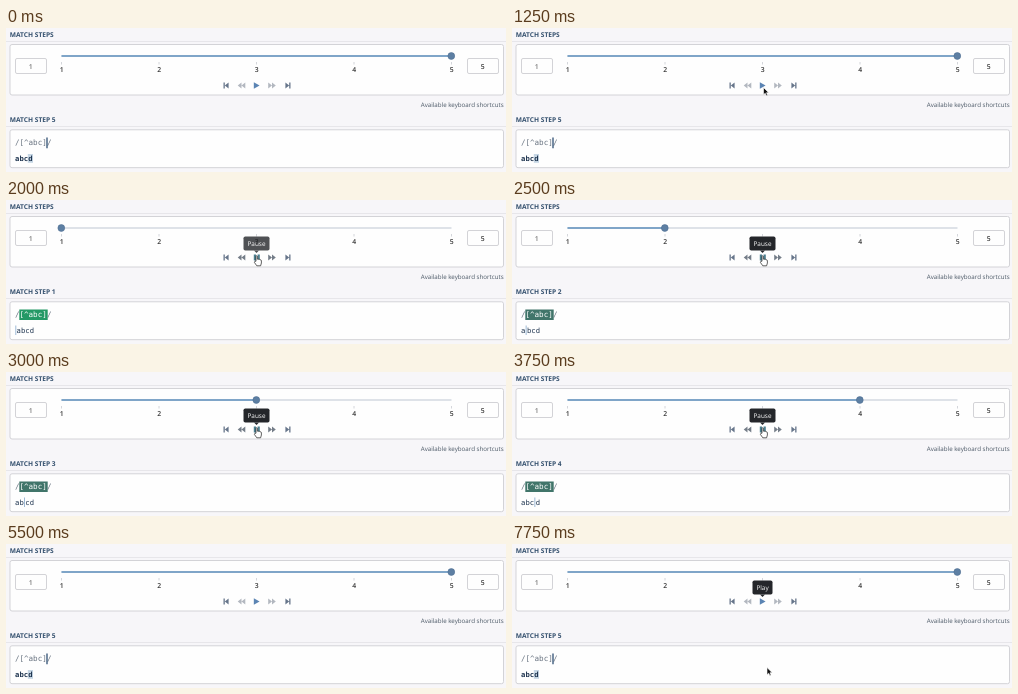
An HTML page for the animation above (8 s loop, 500 px wide and 144 px high).

```html
<!DOCTYPE html>
<html lang="en">
<head>
<meta charset="utf-8">
<title>Match steps</title>
<style>
html, body { margin: 0; width: 100%; height: 100%; overflow: hidden; background: #f7f6f9; }
svg { display: block; width: 500px; height: 144px; font-family: "Open Sans", sans-serif; text-rendering: geometricPrecision; }
.title { font-size: 6.6px; font-weight: 700; fill: #34506e; }
.mid { text-anchor: middle; font-size: 6.8px; font-weight: 600; fill: #333; }
.code { font-family: "DejaVu Sans Mono", monospace; font-size: 7.6px; white-space: pre; }
.box { fill: #fefefe; stroke: #d3d3d7; }
.rule { stroke: #e7e6ea; }
.dark { fill: #66758a; }
</style>
</head>
<body>
<svg viewBox="0 0 500 144">
  <path class="rule" d="M0 13.5H500M0 98.5H500"/>
  <text class="title" x="3.8" y="8.8">MATCH STEPS</text>
  <rect class="box" x="4" y="16.5" width="493.5" height="50.5" rx="2"/>
  <rect class="box" x="9.5" y="30.5" width="31" height="15" rx="1.5"/>
  <rect class="box" x="461.5" y="30.5" width="31" height="15" rx="1.5"/>
  <text class="mid" x="24.8" y="40.6" style="fill:#777">1</text>
  <text class="mid" x="476.8" y="40.6">5</text>
  <g id="ticks"></g>
  <path d="M55.5 28H445.5" stroke="#d3d9e1" stroke-width="1.6"/>
  <path id="fill" stroke="#7fa5c8" stroke-width="1.8"/>
  <circle id="knob" cy="28" r="3.4" fill="#5d7fa3" stroke="#4f6f92" stroke-width=".6"/>

  <path class="dark" d="M217.5 54.5h1.3v6h-1.3zM222.6 54.5v6l-3.8-3z"/>
  <path class="skip" d="M235.5 54.5v6l-3.8-3zM239.3 54.5v6l-3.8-3z"/>
  <path id="play" d="M247.8 54.2l5.8 3.3-5.8 3.3z" fill="#5b84b3"/>
  <path id="pause" d="M247.8 54.5h2.2v6h-2.2zM251.6 54.5h2.2v6h-2.2z" fill="#4d7f8f"/>
  <path class="skip" d="M262.2 54.5v6l3.8-3zM266 54.5v6l3.8-3z"/>
  <path class="dark" d="M279.4 54.5v6l3.8-3zM283.2 54.5h1.3v6h-1.3z"/>

  <g id="tip">
    <rect id="tipBox" y="36.5" height="14" rx="1.8" fill="#24262a"/>
    <path d="M248 50.4h5l-2.5 2.6z" fill="#24262a"/>
    <text id="tipText" class="mid" x="250.5" y="45.8" style="fill:#fff;font-size:6.4px;font-weight:400"></text>
  </g>

  <text x="497.7" y="79.1" text-anchor="end" font-size="6.2" fill="#4b5866">Available keyboard shortcuts</text>
  <text id="title" class="title" x="3.8" y="93.8"></text>
  <rect class="box" x="4" y="101.8" width="493.5" height="37.9" rx="2"/>
  <rect id="mark" x="13.3" y="109.5" width="28.4" height="10.5"/>
  <g class="code">
    <text x="9" y="117.4" fill="#687380">/</text>
    <text id="set" x="13.4" y="117.4">[^abc]</text>
    <text x="41" y="117.4" fill="#687380">/</text>
  </g>
  <path id="patternCaret" d="M41 109.6V120.2" stroke="#2f4f73" stroke-width="1.3"/>
  <rect id="found" x="21.8" y="126" width="5.2" height="8.8" fill="#c6d6e4"/>
  <g id="letters" class="code" style="font-size:7.2px" fill="#1f3550"></g>
  <path id="caret" stroke="#9db9d6"/>

  <path id="arrow" d="M0 0V7.2L1.7 5.7 2.9 8.3 4.1 7.7 3 5.2H5.2Z" fill="#111" stroke="#fff" stroke-width=".6"/>
  <path id="hand" transform="translate(248 55)" fill="#fff" stroke="#222" stroke-width=".7"
    d="M2 6.2V1.2Q2.7 .2 3.4 1.2V4.2Q4.2 3.6 4.8 4.5 5.6 4 6.1 4.8 7.2 4.5 7.4 5.6V8L6.6 10.8H2.8L.4 7.4Q.4 6 2 6.2Z"/>
</svg>
<script>
const $ = id => document.getElementById(id);
const add = (parent, tag, attrs, text = "") => {
  const el = document.createElementNS("http://www.w3.org/2000/svg", tag);
  for (const k in attrs) el.setAttribute(k, attrs[k]);
  el.textContent = text;
  return parent.appendChild(el);
};
const show = (id, on) => $(id).style.display = on ? "" : "none";
const stepX = n => 55.5 + 97.5 * (n - 1);

for (let n = 1; n <= 5; n++) {
  add($("ticks"), "path", { d: `M${stepX(n)} 34v2.5`, stroke: "#c9ccd2", "stroke-width": .8 });
  add($("ticks"), "text", { x: stepX(n) + .2, y: 44, class: "mid" }, n);
}
const letters = [..."abcd"].map(c => add($("letters"), "text", { y: 132.8 }, c));

// Each cue changes only the listed parts of the state.
const idle = { step: 5, playing: false, tip: "", alpha: 1, arrow: null, hand: false };
const cues = [
  [0, idle],
  [750, { arrow: [256, 122] }],
  [1000, { arrow: [254, 90] }],
  [1250, { arrow: [251.5, 59.5] }],
  [1500, { arrow: null, hand: true, tip: "Play", alpha: .8 }],
  [1750, { alpha: 1 }],
  [2000, { step: 1, playing: true, tip: "Pause", alpha: .8 }],
  [2250, { alpha: 1 }],
  [2500, { step: 2 }],
  [3000, { step: 3 }],
  [3750, { step: 4 }],
  [4250, { step: 5 }],
  [4750, { playing: false, tip: "Play" }],
  [5000, { hand: false, arrow: [255, 124] }],
  [5250, { arrow: null, alpha: .4 }],
  [5500, idle],
  [7750, { tip: "Play", arrow: [255, 123.5] }]
];

function draw(t) {
  const s = Object.assign({}, ...cues.filter(c => c[0] <= t).map(c => c[1]));
  const done = s.step === 5, x = stepX(s.step);

  $("fill").setAttribute("d", `M55.5 28H${x}`);
  $("knob").setAttribute("cx", x - .2);
  $("title").textContent = "MATCH STEP " + s.step;
  show("play", !s.playing);
  show("pause", s.playing);
  for (const el of document.querySelectorAll(".skip"))
    el.setAttribute("fill", s.playing ? "#747d88" : "#b3b8c0");

  show("tip", s.tip);
  $("tip").setAttribute("opacity", s.alpha);
  $("tipText").textContent = s.tip;
  const w = s.tip === "Pause" ? 26 : 20;
  $("tipBox").setAttribute("x", 250.5 - w / 2);
  $("tipBox").setAttribute("width", w);

  show("mark", !done);
  $("mark").setAttribute("fill", s.step === 1 ? "#249966" : "#41756a");
  $("set").setAttribute("fill", done ? "#687380" : "#fff");
  show("patternCaret", done);
  show("found", done);
  show("caret", !done);
  const at = s.step - 1;
  $("caret").setAttribute("d", `M${9.8 + 4.35 * at} 125.5v9.5`);
  letters.forEach((el, i) => {
    el.setAttribute("x", 9.1 + 4.35 * i + (!done && i >= at ? 1.5 : 0));
    el.setAttribute("font-weight", done ? 700 : 400);
  });

  show("arrow", s.arrow);
  if (s.arrow) $("arrow").setAttribute("transform", `translate(${s.arrow})`);
  show("hand", s.hand);
}

const start = performance.now();
(function tick() {
  draw((performance.now() - start) % 8000);
  requestAnimationFrame(tick);
})();
</script>
</body>
</html>
```
